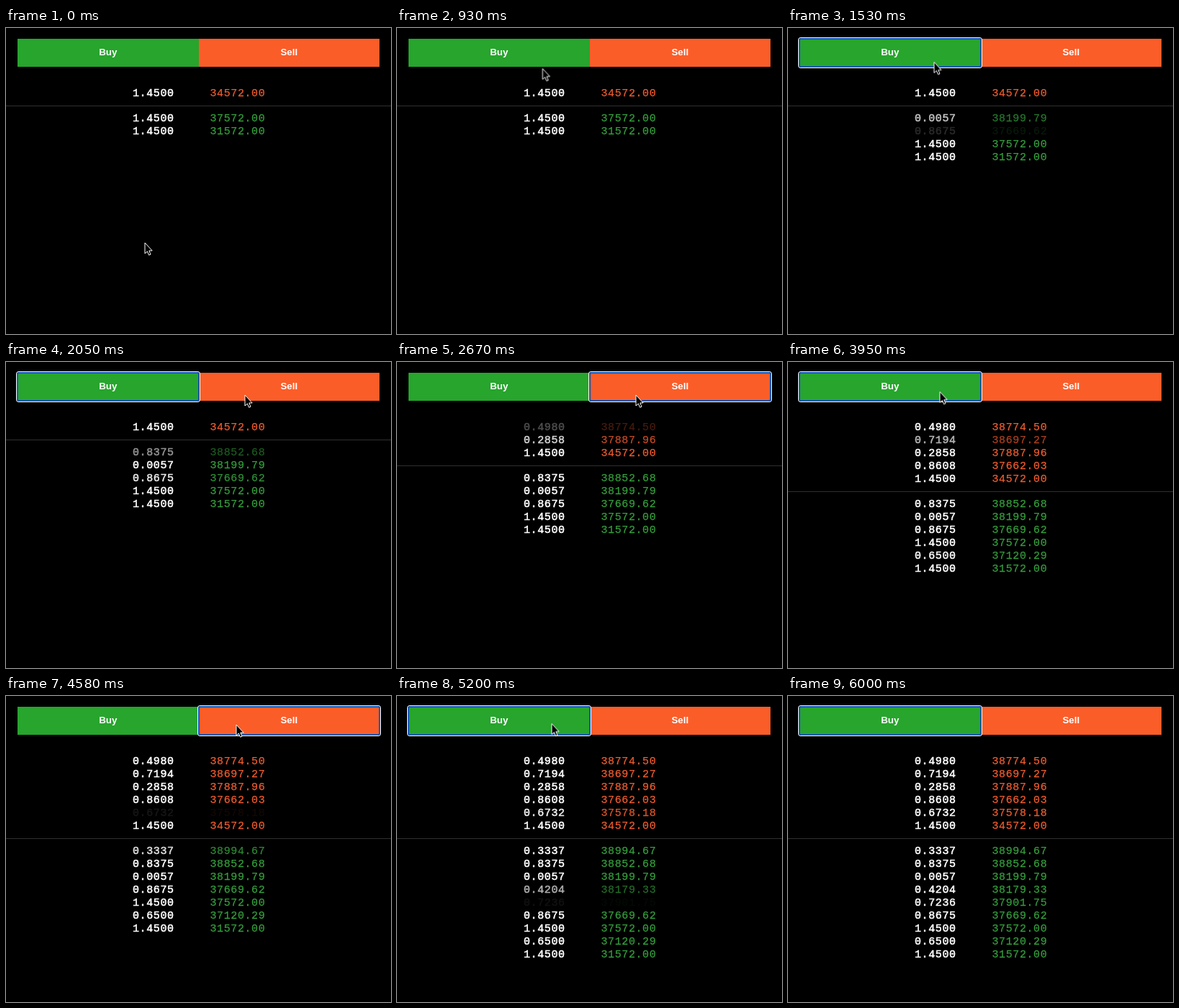
Recreate the animation shown at these times as an HTML page. Size 535 by 426 pixels, loop 7130 ms.

```html
<!DOCTYPE html>
<html lang="en">
<head>
<meta charset="utf-8">
<title>Order book</title>
<style>
  html, body { margin: 0; width: 100%; height: 100%; overflow: hidden; background: #000; }
  #stage { position: relative; width: 535px; height: 426px; overflow: hidden; }
  .button {
    position: absolute; top: 15px; width: 251.5px; height: 39px;
    font: bold 13.333px/38px "Liberation Sans", Arial, sans-serif;
    color: #fff; text-align: center;
  }
  .buy { left: 16px; background: #27a52d; }
  .sell { left: 267.5px; background: #fb5d28; }
  .ring {
    position: absolute; inset: -1px; z-index: 1; opacity: 0;
    border: 2px solid #1656b4; border-radius: 3px;
    box-shadow: 0 0 0 1px #fff;
  }
  #book {
    position: absolute; top: 82px; left: 0; width: 100%;
    font: 15px/18px "Liberation Mono", "Courier New", monospace;
    letter-spacing: .6px;
  }
  .row { position: relative; height: 18px; overflow: hidden; color: #fff; }
  .row span { position: absolute; top: .6px; left: 176px; -webkit-text-stroke: .55px; }
  .row .price { left: 283.5px; -webkit-text-stroke-width: .25px; }
  #buyRows .price { color: #359f3c; }
  #sellRows .price { color: #f05c2e; }
  hr { margin: 8px 0; border: 0; height: 1px; background: #303030; }
  #cursor { position: absolute; left: 0; top: 0; z-index: 2; overflow: visible; }
</style>
</head>
<body>
<div id="stage">
  <div class="button buy">Buy<div class="ring" id="buyRing"></div></div>
  <div class="button sell">Sell<div class="ring" id="sellRing"></div></div>
  <div id="book"><div id="sellRows"></div><hr><div id="buyRows"></div></div>
  <svg id="cursor" width="12" height="18">
    <path d="M0 0V15L3.4 12L5.6 17.2L8 16.2L5.8 11H10.2Z" fill="#000" stroke="#fff"/>
  </svg>
</div>
<script>
const LOOP = 7130, FADE = 1000;
const CLICK_GAP = 325;  // between clicks on the same button
const PRESS = 90;       // focus comes before the first order, leaving follows the last
const GLIDE = 160;      // travel time between buttons
const HIDE = 5800;
const $ = id => document.getElementById(id);

// Each step is [time in ms, properties, easing towards the next step].
function play(el, steps) {
  const final = steps[steps.length - 1][1];
  const frames = [...steps, [LOOP, final]].map(([ms, props, easing = 'step-end']) =>
    ({ ...props, offset: ms / LOOP, easing }));
  el.animate(frames, { duration: LOOP, iterations: Infinity });
}

// Rows stay sorted by falling price.
function addOrder(side, order, arrival) {
  const [amount, price] = order.split(' ');
  const rows = $(side + 'Rows');
  const row = document.createElement('div');
  row.className = 'row';
  row.dataset.price = price;
  row.innerHTML = `<span>${amount}</span><span class="price">${price}</span>`;
  const next = [...rows.children].find(other => +other.dataset.price < +price);
  rows.insertBefore(row, next || null);
  if (arrival) play(row, [
    [0, { height: '0px', opacity: 0 }],
    [arrival, { height: '18px', opacity: 0 }, 'ease'],
    [arrival + FADE, { height: '18px', opacity: 1 }]
  ]);
}

addOrder('sell', '1.4500 34572.00');
addOrder('buy', '1.4500 37572.00');
addOrder('buy', '1.4500 31572.00');

// The pointer visits Buy and Sell in turn and places orders on each visit.
const visits = [
  { start: 1070, orders: ['0.0057 38199.79', '0.8675 37669.62', '0.8375 38852.68'] },
  { start: 2145, orders: ['0.2858 37887.96', '0.4980 38774.50', '0.8608 37662.03'] },
  { start: 3115, orders: ['0.6500 37120.29'] },
  { start: 3530, orders: ['0.7194 38697.27'] },
  { start: 4000, orders: ['0.3337 38994.67'] },
  { start: 4490, orders: ['0.6732 37578.18'] },
  { start: 4800, orders: ['0.4204 38179.33', '0.7236 37901.75'] }
];

const at = (x, y) => ({ transform: `translate(${x}px, ${y}px)` });
const pointer = [
  [0, at(193, 299)],
  [50, at(190, 264)],
  [320, at(189, 226)],
  [670, at(189, 226), 'ease-in-out']
];
const focus = { buy: [[0, { opacity: 0 }]], sell: [[0, { opacity: 0 }]] };

let arrive = visits[0].start - PRESS;
visits.forEach(({ start, orders }, i) => {
  const side = i % 2 ? 'sell' : 'buy';
  const other = i % 2 ? 'buy' : 'sell';
  const leave = start + (orders.length - 1) * CLICK_GAP + PRESS;
  const spot = at(side === 'buy' ? 203 + 2 * i : 335 - 3 * i, 47.5 - 1.5 * i);

  orders.forEach((order, n) => addOrder(side, order, start + n * CLICK_GAP));
  focus[side].push([start - PRESS, { opacity: 1 }]);
  focus[other].push([start - PRESS, { opacity: 0 }]);
  pointer.push([arrive, spot], [leave, spot, 'ease-in-out']);
  arrive = leave + GLIDE;
});

play($('buyRing'), focus.buy);
play($('sellRing'), focus.sell);
play($('cursor'), pointer);
play($('cursor'), [[0, { opacity: 1 }], [HIDE, { opacity: 0 }]]);
</script>
</body>
</html>
```
